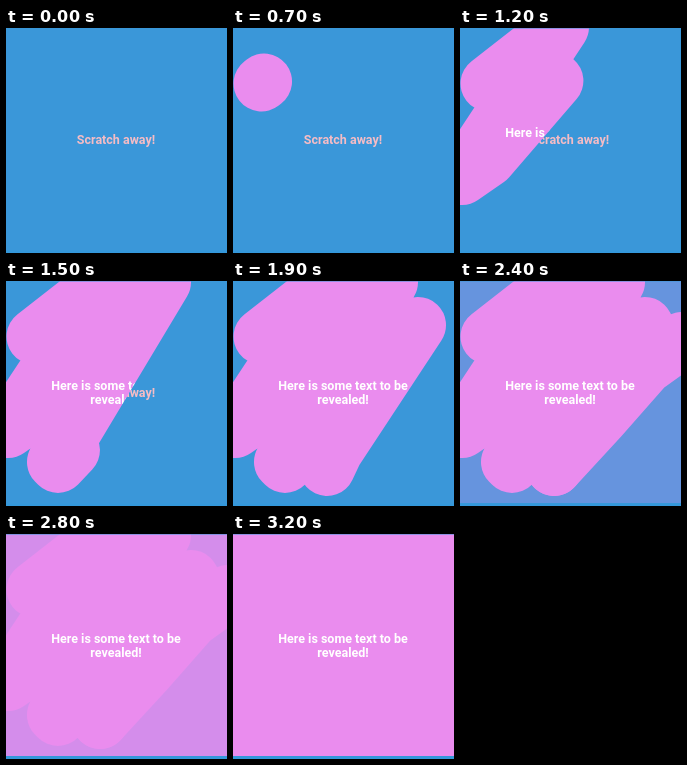
These frames come from a looping animation (221 by 225 pixels, 3.3 s). An HTML page:

```html
<!DOCTYPE html>
<html lang="en">
<head>
<meta charset="utf-8">
<title>Scratch card</title>
<style>
  html, body { margin: 0; width: 100%; height: 100%; overflow: hidden; background: #3498db; }
  svg { display: block; width: 100%; height: 100%; }
  text { font: 600 12.5px Roboto, sans-serif; text-anchor: middle; }
</style>
</head>
<body>
<svg viewBox="0 0 221 225">
  <defs>
    <mask id="scratched" maskUnits="userSpaceOnUse" x="0" y="0" width="221" height="225">
      <rect width="221" height="225" fill="#fff"/>
      <g fill="none" stroke="#000" stroke-width="56" stroke-linecap="round" stroke-linejoin="round">
        <path id="zigzag" pathLength="1" d="M28.5 55.5 L101 -1 L2 149 L28 131 L96 52
          L157 1 L49 181 L52 184 L185 44 L102 170 L94 187"/>
        <path id="swipe" pathLength="1" d="M94 187 L141 136 L185 86 L222 59"/>
      </g>
    </mask>
  </defs>
  <rect y="0.5" width="221" height="221.5" fill="#ea8cee"/>
  <g fill="#fff">
    <text x="110" y="109">Here is some text to be</text>
    <text x="110" y="123">revealed!</text>
  </g>
  <g id="cover" mask="url(#scratched)">
    <rect width="221" height="222.5" fill="#3a97d9"/>
    <text x="110" y="116" fill="#f5bcc5">Scratch away!</text>
  </g>
</svg>
<script>
const LOOP = 3300, STEP = 100;
const [zigzag, swipe, cover] = ["zigzag", "swipe", "cover"].map(id => document.getElementById(id));

const progress = (time, from, to) => Math.min(1, Math.max(0, (time - from) / (to - from)));

// Shows the first part of a stroke; the first dab is a short dash.
function scratch(path, amount, visible) {
  path.style.visibility = visible ? "visible" : "hidden";
  path.setAttribute("stroke-dasharray", `${Math.max(0.003, amount)} 2`);
}

function draw(now) {
  const time = Math.floor((now % LOOP) / STEP) * STEP;
  scratch(zigzag, progress(time, 700, 1800) ** 1.22, time >= 700);
  scratch(swipe, progress(time, 1900, 2100), time > 1900);
  const fade = progress(time, 2100, 3000);
  cover.setAttribute("opacity", (1 + Math.cos(Math.PI * fade)) / 2);
}

const start = performance.now();
function tick() {
  draw(performance.now() - start);
  requestAnimationFrame(tick);
}
tick();
</script>
</body>
</html>
```
